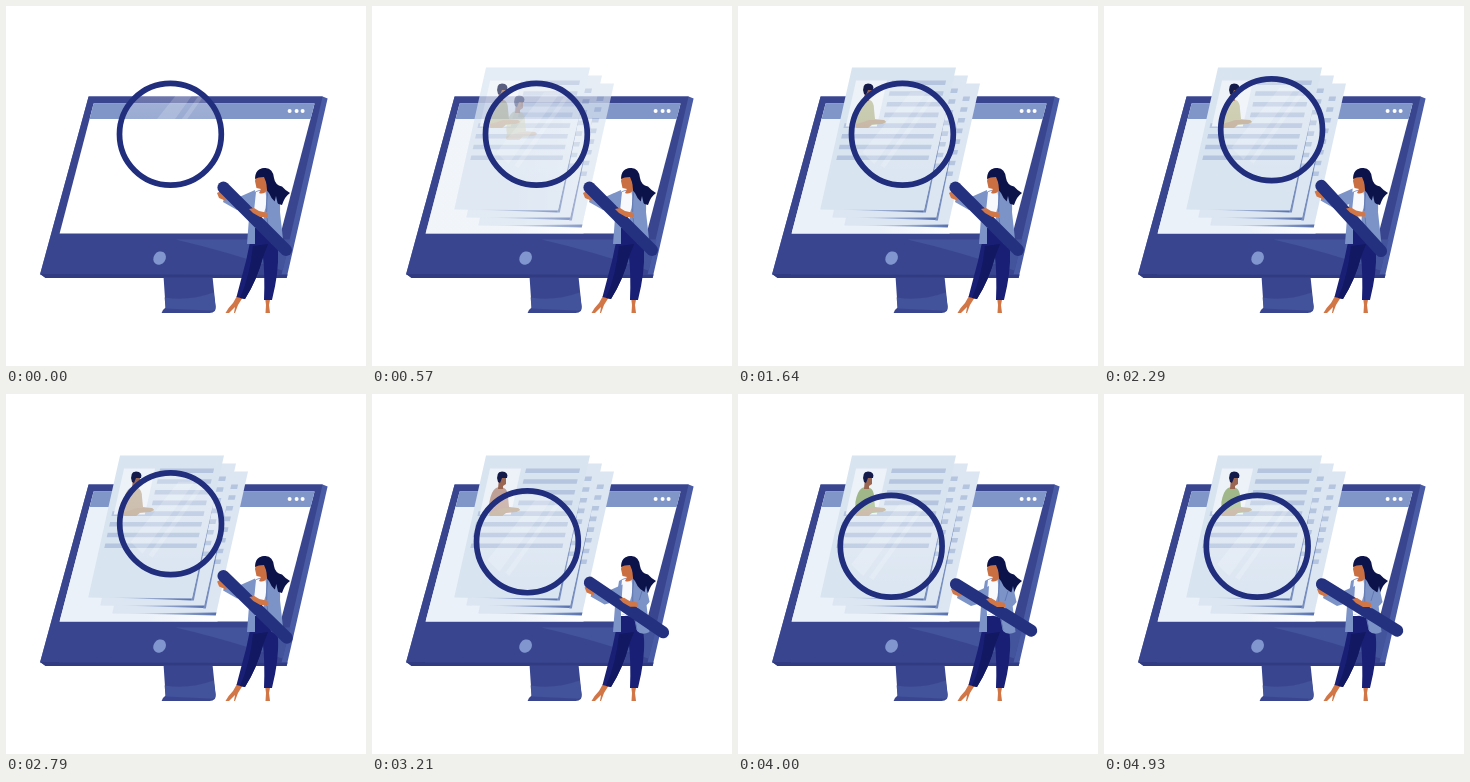
Write an HTML page that moves like this. It is 360 px wide and 360 px high and loops after 5 s.

```html
<!DOCTYPE html>
<html lang="en">
<head>
<meta charset="utf-8">
<style>
  html, body { margin: 0; height: 100%; overflow: hidden; background: #fff; }
  svg { display: block; width: 100vw; height: 100vh; }
</style>
</head>
<body>
<svg viewBox="0 0 360 360">
  <defs>
    <linearGradient id="shade"><stop stop-color="#5872ae" stop-opacity="0"/><stop offset="1" stop-color="#5872ae"/></linearGradient>
    <linearGradient id="glow"><stop stop-color="#ebf1f9"/><stop offset=".55" stop-color="#ebf1f9"/><stop offset="1" stop-color="#fff"/></linearGradient>
    <linearGradient id="glass" x2="0" y2="1"><stop stop-color="#fff" stop-opacity=".28"/><stop offset="1" stop-color="#fff" stop-opacity=".06"/></linearGradient>
    <clipPath id="rim"><circle r="49"/></clipPath>
    <g id="person">
      <path d="M124 94Q128 92 132 94Q136 96 136 103L137 113L146 114L148 116L144 118L134 119L130 122H119Q116 121 118 115Q116 108 120 99Q121 96 124 94Z"/>
      <path d="M131 114L146 114L148 116L144 118L134 118L130 122H119Q116 121 118 118Q126 116 131 114Z" fill="#bda892"/>
      <path d="M127 84H134L134 90L131 92L131 95L126 95Z" fill="#9a6651"/>
      <path d="M126 88Q123 78 130 77.500Q137 78 135 84L130 84L128 89Z" fill="#141b4b"/>
    </g>
  </defs>

  <!-- monitor -->
  <g transform="translate(-.4 -.4)">
    <path d="M83 91L317 91L322 93L281 272.500H40L34.500 268.500Z" fill="#4a5ba5"/>
    <path d="M83 91H317L276 269H34.500Z" fill="#39468f"/>
    <path d="M34.500 268.500L40 272.500H281L282 269Z" fill="#303b82"/>
    <path d="M170 234H285L277 265Q222 246 170 234Z" fill="#43549d"/>
    <path d="M158 272H207L210 301Q211 307.500 204 307.500H156Q157 304 160 302Z" fill="#39468f"/>
    <path d="M159 292Q183 296 208 287L210 301Q210 306 204 305L160 303Z" fill="#42529b"/>
    <path d="M88 98H309L275 228H54Z" fill="#fff"/>
    <path id="wash" d="M84 113H190L212 228H54Z" fill="url(#glow)"/>
    <path d="M88 98H309L305 113.500H84Z" fill="#8196c8"/>
    <g fill="#fff"><circle cx="284" cy="105.500" r="2"/><circle cx="291" cy="105.500" r="2"/><circle cx="297" cy="105.500" r="2"/></g>
    <ellipse cx="154" cy="252.500" rx="6" ry="7" fill="#8196cf" transform="rotate(35 154 252.500)"/>
  </g>

  <g id="papers"></g>

  <!-- woman -->
  <g>
    <g fill="#d17646">
      <path d="M231 290L237 291L232 299L229 307H228L229 301L223 307H219.500Q222 302 227 297Z"/>
      <path d="M259 291H264.500L263 299L264 307H259.500L260 299Z"/>
    </g>
    <path d="M247 222H270L272 245Q273 266 266 294H258Q259 268 257 251Q251 274 239 293L230.500 291Q236 270 240 255Z" fill="#191f75"/>
    <path d="M257 251L262 238L247 240Q244 270 234 292L239 293Q251 274 257 251Z" fill="#121862"/>
    <path d="M247 187Q256 181 268 183Q275 188 274 206L277.500 238Q270 242 265 237L263 224L249 220V238H241L243 212Z" fill="#7c93c8"/>
    <path d="M250 186L259 183Q262 197 258 207L257 222L249 220L248 205Z" fill="#f7f9fd"/>
    <path d="M262 184Q258 207 265 236M270 197L267 207" fill="none" stroke="#6179b3" stroke-width="1"/>
    <path d="M251 175Q250 162 259.500 162Q267 162.500 268 172Q269 179 276 180.500Q280 185 284 187Q279 190 276 199Q267 197 263 187Q259 183 258 175Z" fill="#0c134b"/>
    <path d="M250.500 168L249 175L250.500 182L255 183L253 187Q258 189 261 184L260 173L256 167Z" fill="#c96f42"/>
    <path d="M249 173Q249 162 259.500 162L266 175L262 181L258 171Q252 171 249 173Z" fill="#0c134b"/>
  </g>
  <g id="backArm">
    <path d="M249 184L231 192L219 189L217 196L231 204L248 199Z" fill="#7c93c8"/>
    <path d="M222 190L215 185L211 187L213 192L220 195Z" fill="#d17646"/>
  </g>

  <g id="lens">
    <g clip-path="url(#rim)">
      <circle r="49" fill="url(#glass)"/>
      <g fill="#fff" fill-opacity=".17">
        <path d="M8 -42H24L-28 30L-40 18Z"/>
        <path d="M28 -38H33L-18 34L-22 31Z"/>
      </g>
    </g>
    <circle r="50.900" fill="none" stroke="#202e7d" stroke-width="5.700"/>
  </g>
  <path id="handle" d="M0 0H88.500" stroke="#24317f" stroke-width="12" stroke-linecap="round"/>
  <g id="frontArm">
    <path d="M270 190L273.500 206Q269 213 261 212L259 207L267 202Z" fill="#7c93c8"/>
    <path d="M262 207L253 205L248 202L243 203L247 207L254 211L262 211Z" fill="#d17646"/>
  </g>
</svg>
<script>
const el = id => document.getElementById(id);
const rect = (x, y, w, h, fill) => `<rect x="${x}" y="${y}" width="${w}" height="${h}" fill="${fill}"/>`;
const place = (node, transform) => el(node).setAttribute("transform", transform);

function sheet(level) {
  let s = `<g transform="matrix(1 0 -.224 1 ${114 + 12 * level} ${61.5 + 8 * level})">`;
  s += `<path d="M0 0H104V${145 - level}Q50 143 0 142Z" fill="${level ? "#dce6f2" : "#d9e4f1"}"/>`;
  s += `<path d="M18 142L104 ${143 - level}V${145 - level / 2}Z" fill="url(#shade)"/>`;
  for (let i = 0; i < 8; i++) {
    const x = i < 4 ? 43 : 5;
    s += rect(x, 13 + i * 10.7, 97 - x, 4.6, "#b5c5df");
  }
  // shadow cast by the sheet in front
  if (level) s += `<path d="M90 30L92.500 137H90Z" fill="#5f78b2" fill-opacity=".8"/>`;
  else s += rect(7, 13, 31, 46, "#edf2f9");
  return s + "</g>";
}
el("papers").innerHTML = sheet(2) + sheet(1) + sheet(0) +
  `<use id="ghost" href="#person" transform="translate(17 12)"/><use id="portrait" href="#person"/>`;

const phase = (t, from, to) => Math.min(1, Math.max(0, (t - from) / (to - from)));
const ease = p => p < .5 ? 4 * p ** 3 : 1 - 4 * (1 - p) ** 3;
const mix = (a, b, p) => a + (b - a) * p;
const coats = [[1640, 186, 189, 155], [2290, 194, 194, 160], [3210, 190, 160, 150], [4000, 160, 184, 137]];

function coat(t) {
  let i = 0;
  while (i < 2 && t > coats[i + 1][0]) i++;
  const [a, b] = [coats[i], coats[i + 1]], p = phase(t, a[0], b[0]);
  return `rgb(${[1, 2, 3].map(k => Math.round(mix(a[k], b[k], p)))})`;
}

function draw(now) {
  const t = now % 5000;
  const shown = Math.sin(phase(t, 0, 1150) * Math.PI / 2);
  el("papers").setAttribute("opacity", shown);
  el("wash").setAttribute("opacity", shown);
  el("ghost").setAttribute("opacity", .6 * (1 - phase(t, 570, 1100)));
  el("portrait").setAttribute("fill", coat(t));
  el("ghost").setAttribute("fill", coat(t));

  // a small lift, then the glass swings down to the left
  const lift = ease(phase(t, 1640, 2250)), drop = ease(phase(t, 2250, 3700));
  const swing = 1.19 * drop - .19 * lift;
  place("lens", `translate(${164.4 + 3.2 * lift - 14.4 * drop} ${128.2 - 4.4 * lift + 28.4 * drop})`);
  place("handle", `translate(${217.4 + .5 * swing} ${181.5 + 8.7 * swing}) rotate(${45 - 13.3 * swing})`);
  place("backArm", `translate(${2 * swing} ${8 * swing})`);
  place("frontArm", `translate(${5 * swing} ${2 * swing})`);
  requestAnimationFrame(() => draw(performance.now()));
}
draw(0);
</script>
</body>
</html>
```
